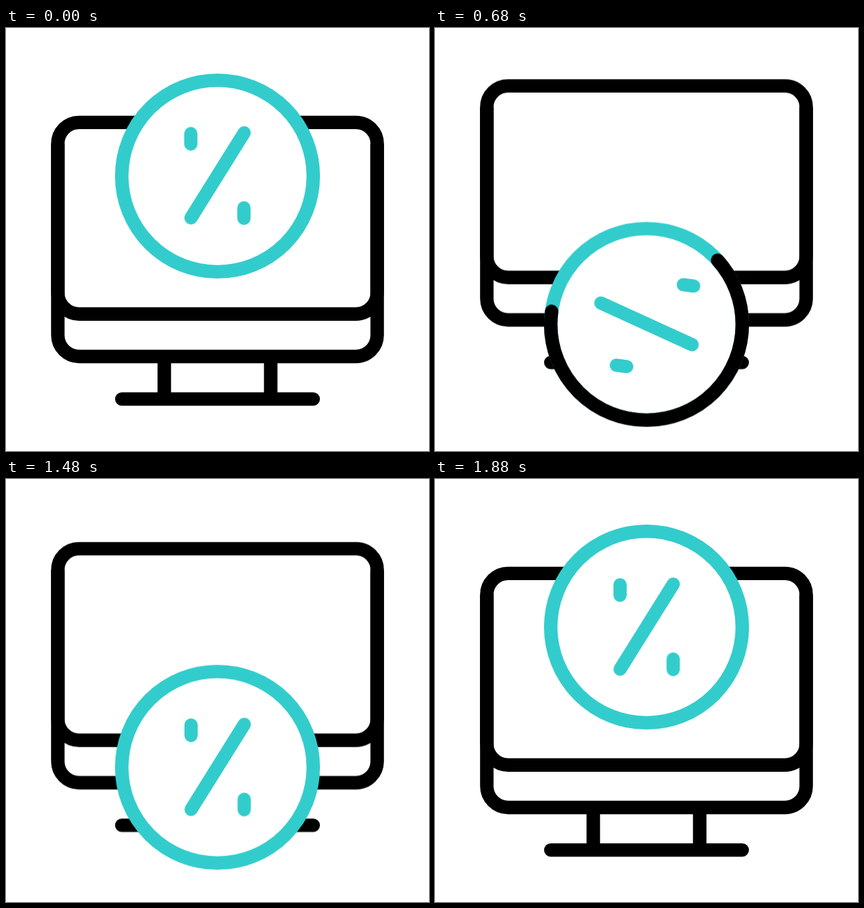
Write an HTML page that moves like this. It is 640x640 px and loops after 2 s.

```html
<!DOCTYPE html>
<html lang="en">
<head>
<meta charset="utf-8">
<title>Discount on screen</title>
<style>
  @property --head { syntax: "<number>"; inherits: false; initial-value: 0; }
  @property --tail { syntax: "<number>"; inherits: false; initial-value: 0; }

  :root { --teal: #33cccc; --w: 20.4px; }
  html, body { margin: 0; width: 100%; height: 100%; overflow: hidden; background: #fff; }
  .stage { position: relative; width: 640px; height: 640px; overflow: hidden; }
  svg { position: absolute; left: 0; top: 0; overflow: visible; fill: none; stroke-width: var(--w); }

  .monitor, .badge, .bar, .dot, .sweep {
    animation: 2s cubic-bezier(.3333, 0, .6667, 1) infinite;
  }

  .monitor { stroke: #000; animation-name: lift; }
  @keyframes lift {
    0%, 14% { transform: translateY(0); }
    28.85% { transform: translateY(-65px); }
    41.6%, 72% { transform: translateY(-38.4px); }
    94%, 100% { transform: translateY(0); }
  }

  .badge { position: absolute; left: 320px; top: 223.5px; width: 0; height: 0; animation-name: drop; }
  @keyframes drop {
    0%, 14% { transform: translateY(0); }
    30.35% { transform: translateY(230px); }
    38.3%, 72% { transform: translateY(217.5px); }
    94%, 100% { transform: translateY(0); }
  }

  .ring { fill: #fff; stroke: var(--teal); }
  .sweep {
    stroke: #000;
    stroke-linecap: round;
    stroke-dasharray: calc((var(--head) - var(--tail)) * 1px) 400px;
    stroke-dashoffset: calc(var(--tail) * -1px);
    animation-name: head, tail, show;
  }
  @keyframes head { 0%, 14% { --head: 0; } 40%, 100% { --head: 360; } }
  @keyframes tail { 0%, 26% { --tail: 0; } 52%, 100% { --tail: 360; } }
  @keyframes show {
    0%, 14%, 52%, 100% { visibility: hidden; }
    14.01%, 51.99% { visibility: visible; }
  }

  .bar, .dot { position: absolute; width: var(--w); border-radius: 10.2px; background: var(--teal); }
  .bar { left: -10.2px; top: -86.15px; height: 172.3px; animation-name: turn; }
  @keyframes turn {
    0%, 14% { transform: rotate(32deg); }
    52%, 100% { transform: rotate(-148deg); }
  }

  /* The dots trade places along outer curves while spinning against the bar. */
  .dot { left: 0; top: 0; height: 36.3px; offset-rotate: 0deg; animation-name: orbit, spin; }
  .left {
    --mid: 63.3%;
    offset-path: path("M-40.2 -56.2C-45 -41 -102 55 -38 63A100 100 0 0 0 40.2 56.2");
  }
  .right {
    --mid: 56.7%;
    offset-path: path("M40.2 56.2A67.5 67.5 0 0 0 64 -58.5A120 120 0 0 0 -40.2 -56.2");
  }
  @keyframes orbit {
    0%, 14% { offset-distance: 0%; }
    33% { offset-distance: var(--mid); }
    52%, 100% { offset-distance: 100%; }
  }
  @keyframes spin {
    0%, 14% { transform: rotate(0deg); }
    52%, 100% { transform: rotate(180deg); }
  }
</style>
</head>
<body>
<div class="stage">
  <svg width="640" height="640" viewBox="0 0 640 640">
    <g class="monitor">
      <rect x="78.4" y="142.9" width="483.2" height="289.8" rx="32.2"/>
      <path d="M78.4 175V464.8a32.2 32.2 0 0 0 32.2 32.2H529.4a32.2 32.2 0 0 0 32.2 -32.2V175"/>
      <path d="M239.5 497V561M400.5 497V561"/>
      <path d="M175.2 561.4H464.8" stroke-linecap="round"/>
    </g>
  </svg>
  <div class="badge">
    <svg width="1" height="1">
      <circle class="ring" r="144.9"/>
      <path class="sweep" pathLength="360" d="M0 -144.9A144.9 144.9 0 0 0 0 144.9A144.9 144.9 0 0 0 0 -144.9"/>
    </svg>
    <div class="bar"></div>
    <div class="dot left"></div>
    <div class="dot right"></div>
  </div>
</div>
</body>
</html>
```
